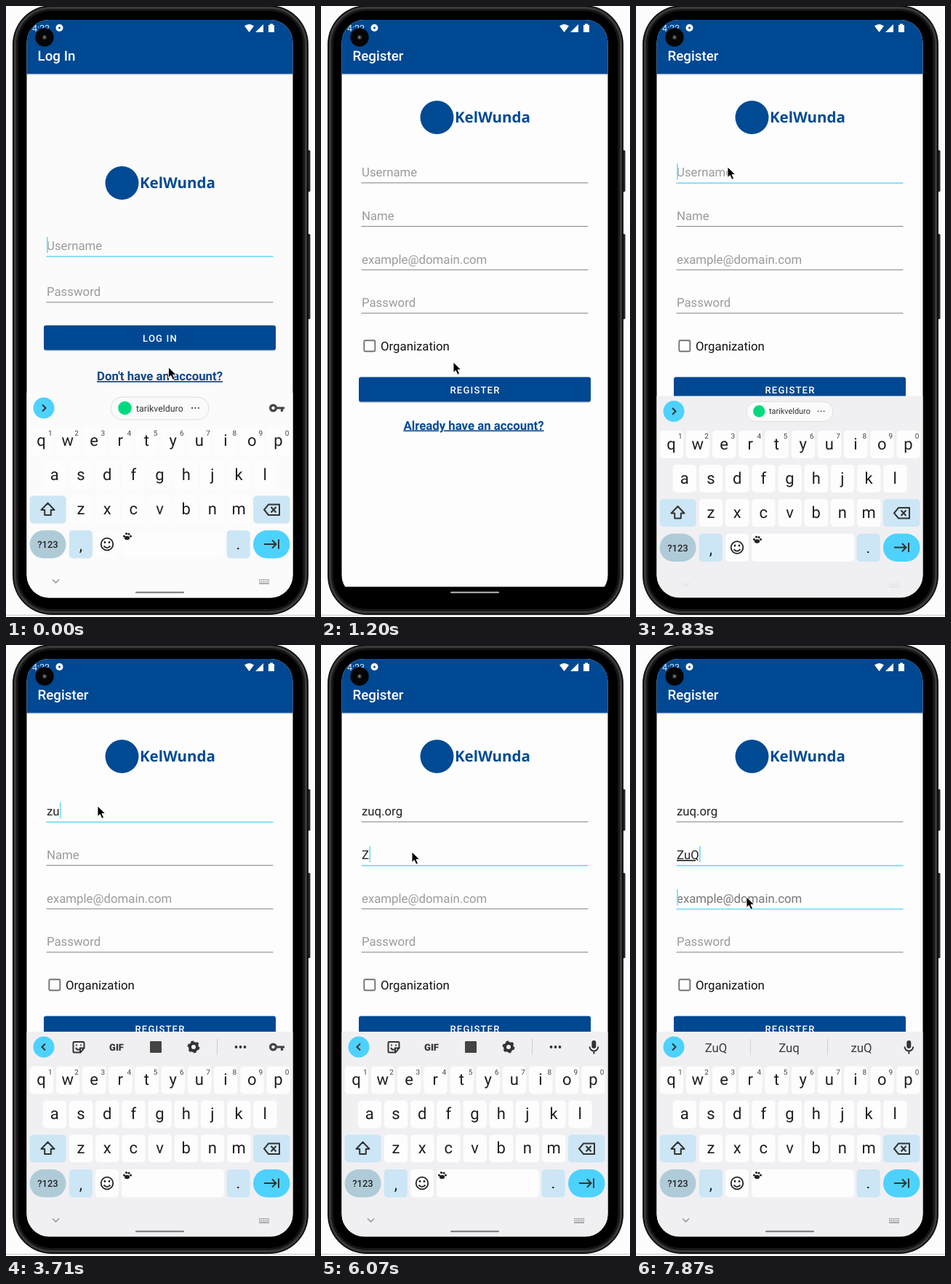
An HTML page for the animation above (8000 ms loop, 425x839 px).

```html
<!DOCTYPE html>
<html lang="en">
<head>
<meta charset="utf-8">
<title>Register screen</title>
<style>
html, body { margin: 0; width: 100%; height: 100%; overflow: hidden; background: #fcfcfc; }
svg { display: block; width: 425px; height: 839px; font-family: Roboto, sans-serif; text-rendering: geometricPrecision; }
.title { font-size: 18.8px; font-weight: 500; fill: #fff; }
.brand { font: 700 20.5px "Noto Sans", sans-serif; fill: #004a94; }
.field { font-size: 16.8px; }
.hint { fill: #9b9b9b; }
.typed { fill: #222; }
.btn { font-size: 13.1px; font-weight: 500; letter-spacing: 1.17px; fill: #fff; text-anchor: middle; }
.link { font-size: 16.8px; font-weight: 700; fill: #004a94; text-anchor: middle; text-decoration: underline; }
.key { font-size: 22px; fill: #1f1f1f; text-anchor: middle; }
.num { font-size: 10px; fill: #444; text-anchor: middle; }
.sug { font-size: 16.8px; fill: #3a3a3a; text-anchor: middle; }
.line { fill: none; stroke: #333; stroke-width: 2; }
</style>
</head>
<body>
<svg id="stage" viewBox="0 0 425 839"></svg>
<script>
const LOOP = 8000, TICK = 148.5;
const BLUE = '#004892', CYAN = '#4dd2fd', PALE = '#cce6f5';

const text = (x, y, s, cls, extra = '') => `<text x="${x}" y="${y}" class="${cls}" ${extra}>${s}</text>`;
const box = (x, y, w, h, fill, r = 0, extra = '') =>
  `<rect x="${x}" y="${y}" width="${w}" height="${h}" rx="${r}" fill="${fill}" ${extra}/>`;
const dot = (x, y, r, fill, extra = '') => `<circle cx="${x}" cy="${y}" r="${r}" fill="${fill}" ${extra}/>`;
const line = (d, extra = '') => `<path d="${d}" class="line" ${extra}/>`;
const part = (cls, body) => `<g class="${cls}">${body}</g>`;

function header(title) {
  return box(28, 93.3, 367, 1.5, '#00000022') + box(28, 19, 367, 74.3, BLUE) + text(43.5, 75, title, 'title');
}
function logo(y) {
  return dot(159.5, y, 23, '#004a94') + text(184, y + 7, 'KelWunda', 'brand');
}
function field(id, y, hint) {
  return `<g id="${id}">` + text(56, y, hint, 'field hint') + text(56, y, '', 'field typed') +
    box(55.5, y + 8, 312, 1.1, '#8c8c8c', 0, 'class="rule"') +
    box(56, y - 18, 1.8, 22, '#7fdcf5', 0, 'class="caret"') + '</g>';
}
function button(y, label) {
  return box(52, y + 1, 319, 34.5, '#00000028', 3) + box(52, y, 319, 34, BLUE, 3) + text(212, y + 22.3, label, 'btn');
}

// Toolbar states above the keys
function strips() {
  const chip = box(144, 537, 135, 31, '#fbfbfb', 15.5, 'stroke="#dcdcdc"') + dot(163.5, 552, 9.3, '#00d97e') +
    text(179, 556.5, 'tarikvelduro', '', 'font-size="12.4" fill="#333"') +
    [256, 260.5, 265].map(x => dot(x, 552, 1.2, '#666')).join('');
  const gear = dot(258, 552, 5, 'none', 'stroke="#333" stroke-width="4"') +
    dot(258, 552, 7.2, 'none', 'stroke="#333" stroke-width="2.4" stroke-dasharray="3.8 3.74"');
  const tools = line('M94 545h12q1.5 0 1.5 1.5v7l-5 6h-8.500q-1.500 0-1.500-1.500v-11.500q0-1.500 1.500-1.500zM107 553.500h-5v5', 'stroke-width="1.8"') +
    line('M96 553q2 4 5 2', 'stroke-width="1.4"') + dot(97, 549.5, 1.1, '#333') + dot(103, 549.5, 1.1, '#333') +
    text(152, 556.8, 'GIF', '', 'font-size="13" font-weight="900" fill="#333" text-anchor="middle"') +
    box(198, 544, 16, 16, '#444', 1) + gear +
    box(290, 541, 1, 22, '#ccc') + [316.5, 322.5, 328.5].map(x => dot(x, 552, 1.9, '#333')).join('');
  const split = box(157, 541, 1, 22, '#d0d0d0') + box(263, 541, 1, 22, '#d0d0d0');
  const words = list => list.map((w, i) => text([110, 210.5, 310][i], 559, w, 'sug')).join('');
  return part('chip', chip) + part('tools', tools) +
    part('early', split + words(['Zu', 'Zug', 'zu'])) +
    part('late', split + words(['ZuQ', 'Zuq', 'zuQ'])) +
    part('lock', dot(367.5, 552, 3.9, 'none', 'stroke="#444" stroke-width="3.2"') + line('M372 552h11M379.5 552v5', 'style="stroke:#444;stroke-width:3.2"')) +
    part('mic', box(372.3, 543, 6, 11, '#333', 3) + line('M369.5 551.5a5.9 5.9 0 0 0 11.8 0M375.4 557.5v4')) +
    dot(52, 552, 14.5, CYAN) + part('more', line('M50 547.5l4.5 4.5-4.5 4.5')) + part('less', line('M54 547.5l-4.5 4.5 4.5 4.5'));
}

function keyboard(id) {
  const P = 36.2;
  const row = (s, x0, y) => [...s].map((c, i) =>
    box(x0 + i * P, y, 32.4, 38, '#fdfdfd', 5) + text(x0 + 16 + i * P, y + 25.5, c, 'key')).join('');
  const digits = [...'1234567890'].map((c, i) => text(60.8 + i * P, 589.5, c, 'num')).join('');
  const paw = [[162.5, 728], [165.5, 724.5], [169, 725], [171.5, 728]].map(p => dot(...p, 1.6, '#222')).join('') +
    '<ellipse cx="166.5" cy="730.5" rx="3.6" ry="2.8" fill="#222"/>';
  let dots = '';
  for (let r = 0; r < 3; r++) for (let c = 0; c < (r < 2 ? 6 : 1); c++)
    dots += box(348 + c * 2.5, 787 + r * 2.7, r < 2 ? 1.6 : 14, 1.6, '#999');
  return `<g id="${id}">` + box(28, 531, 367, 300, '#f0f0f3', 0, 'class="back"') + strips() +
    row('qwertyuiop', 32.6, 578.5) + digits + row('asdfghjkl', 50.7, 625.5) + row('zxcvbnm', 86.9, 672.5) +
    box(32.6, 672.5, 50, 38, PALE, 5) + line('M57.5 682.5l-9 9.5h4.7v7h8.6v-7h4.7z', 'stroke-linejoin="round"') +
    box(340, 672.5, 50.5, 38, PALE, 5) + line('M361 684.5h15v14.5h-15l-6-7.25zM364.5 688l7 7.5M371.5 688l-7 7.5') +
    box(32.6, 720, 50, 38.5, '#b0cbd8', 19) + text(57.5, 744, '?123', '', 'font-size="13" font-weight="500" fill="#222" text-anchor="middle"') +
    box(86.9, 720, 32, 38.5, PALE, 5) + text(103, 748, ',', 'key') +
    box(123, 720, 32, 38.5, '#fdfdfd', 5) + dot(139, 739, 8.3, 'none', 'stroke="#222" stroke-width="1.8"') +
    dot(136, 736.5, 1.4, '#222') + dot(142, 736.5, 1.4, '#222') + line('M134.5 741.5q4.5 5 9 0') +
    box(159, 720, 141, 38.5, '#fdfdfd', 5) + paw +
    box(303.6, 720, 32, 38.5, PALE, 5) + text(319.5, 746, '.', 'key') +
    box(340, 720, 50.5, 38.5, CYAN, 19) + line('M355 739h16M366 733.5l5.5 5.5-5.5 5.5M375 732.5v13') +
    part('nav', line('M64 787.5l4.5 4.5 4.5-4.5', 'style="stroke:#999;stroke-width:1.6"') + dots) + '</g>';
}

const phone = box(0, 836, 425, 1, '#c9c9c9') +
  box(414, 198, 4.5, 57, '#222', 1.5) + box(414, 313, 4.5, 117, '#222', 1.5) +
  box(9, -1, 407, 837, '#0d0d0d', 54) +
  box(12.5, 2.5, 400, 830, '#161616', 50, 'stroke="#3a3a3a" stroke-width="3"') +
  box(17, 7, 391, 821, '#000', 45);

const login = '<g id="login">' + box(28, 19, 367, 794, '#fbfbfb') + header('Log In') + logo(243) +
  field('user0', 335, 'Username') + field('pass0', 398.3, 'Password') +
  button(438.5, 'LOG IN') + text(211.5, 514, "Don't have an account?", 'link') + keyboard('kb0') + '</g>';

const register = '<g id="register">' + box(28, 19, 367, 794, '#000') + box(28, 19, 367, 778.5, '#fdfdfd') +
  header('Register') + logo(153) +
  field('user', 234.3, 'Username') + field('name', 294, 'Name') +
  field('mail', 353.7, 'example@domain.com') + field('pass', 413.3, 'Password') +
  box(59.3, 459.3, 15, 15, 'none', 1.5, 'stroke="#757575" stroke-width="1.9"') + text(82, 473, 'Organization', 'field', 'fill="#111"') +
  button(509.5, 'REGISTER') + text(210, 581.5, 'Already have an account?', 'link') + keyboard('kb') + '</g>';

const status = text(36, 34.5, '4:22', '', 'id="clock" font-size="12.5" fill="#dfeaf5"') +
  dot(73.5, 30, 5, '#fff') + dot(73.5, 30, 1.5, BLUE) +
  '<path d="M328 27.5q6.5-5 13 0l-6.5 8.5zM354 25v11h-11zM361 26h2v-1.5h4v1.5h2v10h-8z" fill="#fff"/>' +
  dot(53, 43, 12.7, '#050505') + dot(53, 43, 3.2, '#2e2e2e') + dot(53, 43, 1.4, '#888');

const stage = document.getElementById('stage');
stage.innerHTML = `<defs><clipPath id="glass">${box(28.5, 19, 366, 793.5, '#000', 31)}</clipPath></defs>` +
  box(0, 0, 425, 839, '#fcfcfc') + phone +
  `<g clip-path="url(#glass)">${login}${register}${status}${box(178, 804.3, 67, 2, '#777', 1, 'id="pill"')}</g>` +
  '<path id="mouse" d="M0 0v14.5l3.3-3 2.5 5.7 2.7-1.2-2.5-5.5h4.7z" fill="#000" stroke="#fff" stroke-width="0.9"/>';

const $ = s => stage.querySelector(s);
const show = (s, on) => { $(s).style.display = on ? '' : 'none'; };
const attr = (s, k, v) => $(s).setAttribute(k, v);
const zoom = (s, f) => attr(s, 'transform', `translate(${212 * (1 - f)} ${414 * (1 - f)}) scale(${f})`);

// [tick, value] steps: last one reached wins
const at = (steps, k) => steps.reduce((v, s) => k >= s[0] ? s[1] : v, steps[0][1]);

const path = [[0, 223.5, 496], [2, 237.5, 503.5], [5, 237.5, 503.5], [7, 205, 497], [8, 182, 489], [11, 130, 380], [13, 113, 270],
  [15, 126, 221], [30, 126, 221], [32, 132, 267], [34, 125, 284], [46, 125, 284], [52, 152, 346], [54, 152, 346]];
const userSteps = [[0, ''], [24, 'z'], [25, 'zu'], [27, 'zuq'], [29, 'zuq.'], [30, 'zuq.o'], [31, 'zuq.or'], [32, 'zuq.org']];
const nameSteps = [[0, ''], [41, 'Z'], [43, 'Zu'], [46, 'ZuQ']];
const enter = [[0, 0.85], [3, 0.91], [4, 0.973], [5, 0.992], [6, 0.998], [7, 1]];
const leave = [[0, 1], [3, 1.02], [4, 1.04]];

function mouseAt(k) {
  const i = Math.max(1, path.findIndex(p => p[0] >= k));
  const [a, x, y] = path[i - 1], [b, u, v] = path[i], f = (k - a) / (b - a);
  return [x + (u - x) * f, y + (v - y) * f];
}

function setField(id, value, lit, caret) {
  const s = '#' + id, typed = $(s + ' .typed');
  typed.textContent = value;
  show(s + ' .hint', !value);
  attr(s + ' .rule', 'fill', lit ? '#7fdcf5' : '#8c8c8c');
  attr(s + ' .rule', 'height', lit ? 1.8 : 1.1);
  show(s + ' .caret', caret);
  if (caret) attr(s + ' .caret', 'x', 56 + (value ? typed.getComputedTextLength() + 0.3 : 0));
}

function setStrip(kb, mode, edge) {
  for (const m of ['chip', 'tools', 'early', 'late']) show(`#${kb} .${m}`, m === mode);
  show(`#${kb} .less`, mode === 'tools');
  show(`#${kb} .more`, mode !== 'tools');
  for (const e of ['lock', 'mic']) show(`#${kb} .${e}`, e === edge);
}

setField('user0', '', true, true);
setField('pass0', '', false, false);
setField('pass', '', false, false);
setStrip('kb0', 'chip', 'lock');

function render(t) {
  const k = Math.floor((t + 25) / TICK);

  show('#login', k < 7);
  show('#register', k >= 3);
  zoom('#login', at(leave, k));
  zoom('#register', at(enter, k));
  attr('#register', 'opacity', k === 3 ? 0.7 : 1);
  attr('#kb0 .back', 'fill', k < 3 ? '#fbfbfb' : '#f0f0f3');
  show('#kb0 .nav', k < 3);

  const user = at(userSteps, k), name = at(nameSteps, k);
  const onUser = k >= 18 && k < 35, onName = k >= 35;
  setField('user', user, onUser, onUser && !(k >= 22 && k < 24));
  setField('name', name, onName, onName && !(k >= 39 && k < 41));
  setField('mail', '', k >= 53, k >= 53);
  $('#mail .hint').style.fill = k >= 53 ? '#777' : '';
  $('#name .typed').style.textDecoration = k >= 43 ? 'underline' : 'none';

  const rise = at([[0, 282], [18, 90], [19, 4.5], [20, 0]], k);
  show('#kb', k >= 18);
  attr('#kb', 'transform', `translate(0 ${rise})`);
  attr('#kb .nav', 'opacity', k < 20 ? 0.15 : 1);
  const mode = at([[0, 'chip'], [24, 'tools'], [36, 'none'], [41, 'tools'], [43, 'early'], [46, 'late']], k);
  setStrip('kb', mode, at([[0, ''], [20, 'lock'], [36, 'mic']], k));
  const c = k < 20 ? 0.88 : 1;
  attr('#kb .chip', 'transform', `translate(${211.5 * (1 - c)} ${552 * (1 - c)}) scale(${c})`);

  $('#clock').textContent = k < 34 ? '4:22' : '4:23';
  attr('#pill', 'fill', at([[0, '#777'], [5, '#b8b8b8'], [18, '#eee'], [20, '#777']], k));
  attr('#mouse', 'transform', `translate(${mouseAt(k).join(' ')})`);
}

const start = performance.now();
function loop() {
  render((performance.now() - start) % LOOP);
  requestAnimationFrame(loop);
}
render(0);
requestAnimationFrame(loop);
</script>
</body>
</html>
```
